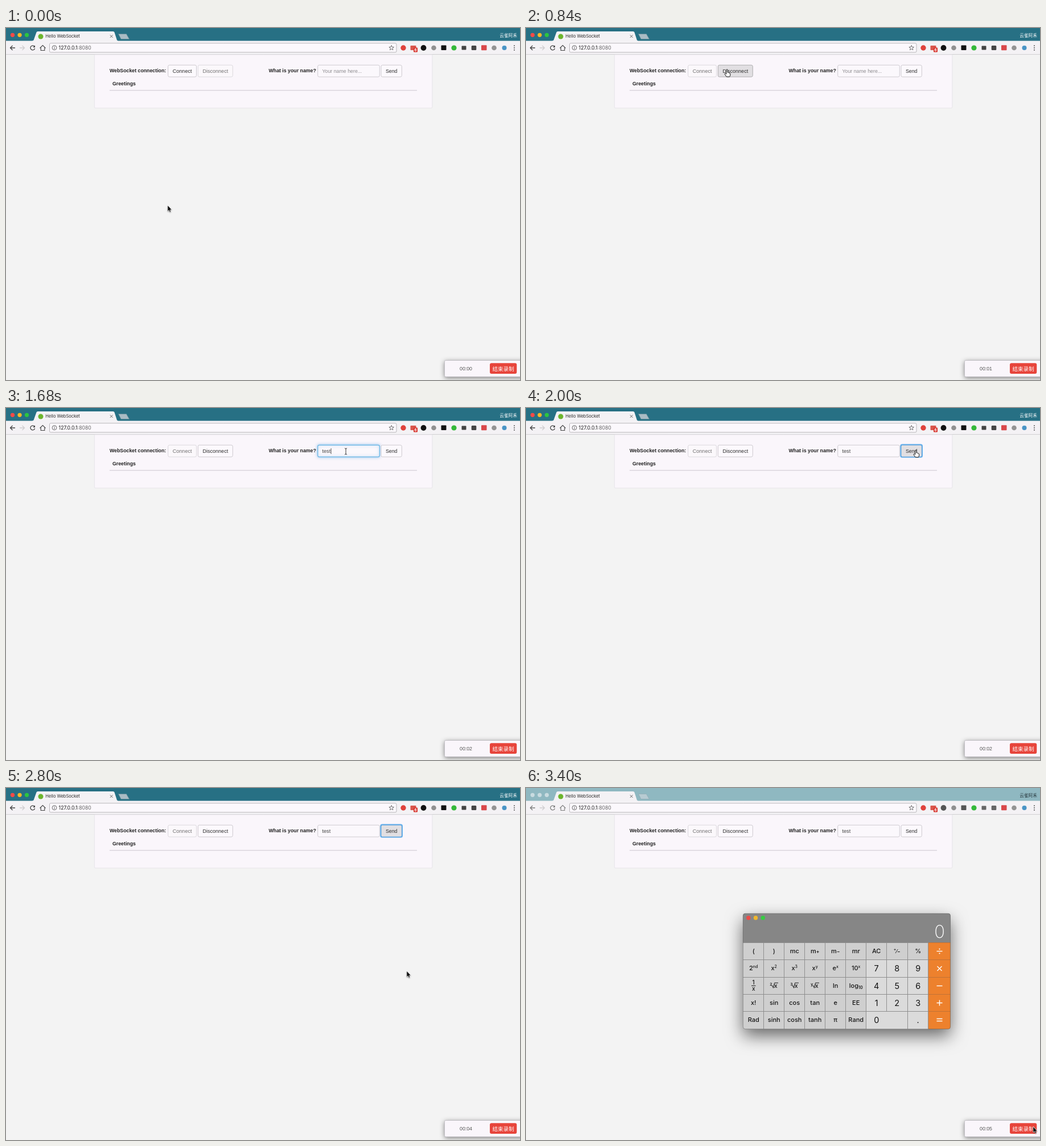
Animation of 903x620 px, one loop 3.44 s. Source, as an HTML page with a canvas:

```html
<!DOCTYPE html>
<html lang="en">
<head>
<meta charset="utf-8">
<title>Hello WebSocket</title>
<style>
html, body { margin: 0; width: 100%; height: 100%; overflow: hidden; background: #f3f3f3; }
canvas { display: block; }
</style>
</head>
<body>
<canvas id="stage" width="903" height="620"></canvas>
<script>
const c = document.getElementById('stage').getContext('2d');
const LOOP = 3440, STEP = 40;
const SANS = '"Liberation Sans", Arial, sans-serif';
const UI = 'Inter, Roboto, sans-serif';
const CJK = '"Noto Sans CJK SC", "Noto Sans CJK", sans-serif';

// Moments when the page state changes, in ms
const CONNECTED = 680, FOCUS = 1200, TYPE = 1360, KEY = 80, SENT = 1920, CALC = 2840;
// Pointer stops: time, x, y
const PATH = [
  [0, 284, 313], [80, 284, 313], [480, 319, 74], [760, 319, 74], [1120, 590, 76],
  [1640, 590, 76], [1880, 685, 75], [2080, 685, 75], [2480, 704, 323],
  [2960, 704, 323], [3340, 891, 597], [LOOP, 891, 597]
];

function text(s, x, y, size, color, font = SANS, weight = 400, align = 'left') {
  c.font = `${weight} ${size}px ${font}`;
  c.textAlign = align;
  c.fillStyle = color;
  c.fillText(s, x, y);
}
function box(x, y, w, h, r, fill, stroke, lw = 1) {
  c.beginPath();
  c.roundRect(x, y, w, h, r);
  if (fill) { c.fillStyle = fill; c.fill(); }
  if (stroke) { c.strokeStyle = stroke; c.lineWidth = lw; c.stroke(); }
}
function dot(x, y, r, fill) {
  c.beginPath();
  c.arc(x, y, r, 0, 7);
  c.fillStyle = fill;
  c.fill();
}
function shape(pts, fill, stroke, lw = 1) {
  c.beginPath();
  pts.forEach(p => c.lineTo(p[0], p[1]));
  c.closePath();
  if (fill) { c.fillStyle = fill; c.fill(); }
  if (stroke) { c.strokeStyle = stroke; c.lineWidth = lw; c.stroke(); }
}
function stroke(d, color, lw = 1) {
  c.strokeStyle = color;
  c.lineWidth = lw;
  c.stroke(new Path2D(d));
}
function shadow(color, blur, dy) {
  c.shadowColor = color;
  c.shadowBlur = blur;
  c.shadowOffsetY = dy;
}

function drawBrowser(on) {
  c.fillStyle = on ? '#277084' : '#8fb8c1';
  c.fillRect(0, 0, 903, 24);
  const lights = on ? ['#fb4a47', '#fdb825', '#2cc63f'] : Array(3).fill('#c9dbe0');
  lights.forEach((col, i) => dot(11.5 + 12.5 * i, 12.3, 3.6, col));

  c.fillStyle = '#f4f2f5';
  c.fillRect(0, 22.6, 903, 23.9);
  c.fill(new Path2D('M46 23L48.500 21.500L53.500 7.500Q54 6 56 6H188Q190 6 190.500 7.500L195 21.500L197 23Z'));
  shape([[197.5, 10.5], [211.5, 10.5], [216.5, 19.5], [202, 19.5]], on ? '#a9bbc4' : '#b7cbd2', on ? '#5f8b9a' : '#8caab3', .7);
  c.fillStyle = '#c9c7ca';
  c.fillRect(0, 46, 903, .8);

  dot(61, 15, 4.5, '#6db52d');
  text('Hello WebSocket', 69.3, 17.3, 7.5, '#2a2a2a', UI);
  stroke('M182.800 12.200l4.800 4.800m0-4.800l-4.800 4.800', '#666', 1);
  text('云雀阿禾', 898, 15.8, 7.7, on ? '#fff' : '#26363b', CJK, 500, 'right');

  const ink = on ? '#444' : '#7d7d7d';
  stroke('M16 35H7.500M11.500 31l-4 4l4 4', ink, 1.3);
  stroke('M24 35h8.500M28.500 31l4 4l-4 4', '#cfcdd0', 1.3);
  stroke('M49.700 32.300A3.900 3.900 0 1 0 50.600 36', ink, 1.3);
  shape([[51, 30.6], [51, 34.3], [47.3, 34.3]], ink);
  stroke('M59.500 35.500L64.500 30.500L69.500 35.500M61.200 34.800V39.500H67.800V34.800', ink, 1.1);

  box(76.5, 26.8, 609.5, 16, 2, '#fbf8fc', '#b9b7ba');
  c.beginPath();
  c.arc(85, 34.8, 3.9, 0, 7);
  c.strokeStyle = '#555';
  c.lineWidth = .9;
  c.stroke();
  c.fillStyle = '#555';
  c.fillRect(84.5, 34.2, 1, 2.8);
  c.fillRect(84.5, 32.4, 1, 1);
  text('127.0.0.1', 92.6, 38, 8.7, '#1c1c1c', UI);
  const w = c.measureText('127.0.0.1').width;
  text(':8080', 92.6 + w, 38, 8.7, '#666', UI);
  const star = Array.from({ length: 10 }, (_, i) => {
    const a = i * Math.PI / 5 - Math.PI / 2, r = i % 2 ? 1.9 : 4.5;
    return [677.2 + r * Math.cos(a), 35 + r * Math.sin(a)];
  });
  shape(star, null, '#555', .8);

  const dark = on ? '#111' : '#555';
  const mid = on ? '#444' : '#666';
  dot(698, 35, 4.7, '#e0423c');
  box(710.5, 31, 10, 8, 1, '#d9564c');
  box(716, 34.5, 7, 8, 1, '#d8352f');
  text('6', 719.5, 41.2, 7, '#fff', SANS, 700, 'center');
  dot(733.5, 35, 4.9, dark);
  dot(751.5, 35, 4.3, '#909090');
  box(764.5, 30.5, 9, 8.5, 1, dark);
  dot(787, 35, 4.6, '#34b93a');
  box(800.5, 31.5, 8, 7, 1, mid);
  box(817.7, 31, 8.6, 8, 1.5, mid);
  box(835, 30.3, 9.5, 9, 1, '#d9484a');
  dot(857.5, 35, 4.3, '#949494');
  dot(875.5, 35, 4, '#4a95c6');
  [31.2, 35, 38.8].forEach(y => dot(893, y, 1.05, '#555'));
}

function button(s, x, w, size, { off, hot, ring } = {}) {
  c.save();
  if (off) c.globalAlpha = .67;
  if (ring) box(x - .7, 64.6, w + 1.4, 22, 2.5, null, '#62b0ee', 2);
  box(x, 65.3, w, 20.8, 2.5, hot ? '#e1dfe2' : '#fcf9fd', ring ? '#5b9fd6' : hot ? '#a9a7aa' : '#c9c6cb', .9);
  text(s, x + w / 2, 79, size, '#2e2e2e', SANS, 400, 'center');
  c.restore();
}

function drawPage(t, x, y) {
  const open = t >= CONNECTED, sent = t >= SENT, calc = t >= CALC;
  const over = (l, r) => x > l && x < r && y > 64 && y < 87;
  box(155.3, 47, 593.6, 94, [0, 0, 2, 2], '#faf6fb', '#e5e2e7', .9);

  text('WebSocket connection:', 182, 78.3, 8.78, '#222', SANS, 700);
  text('What is your name?', 461.5, 78.3, 8.78, '#222', SANS, 700);
  text('Greetings', 187, 101, 8.78, '#222', SANS, 700);
  c.fillStyle = '#d6d2d9';
  c.fillRect(182, 109.2, 540, 1.3);

  button('Connect', 284.7, 49.8, 9.05, { off: open, hot: !open && over(284, 335) });
  button('Disconnect', 337.3, 61, 9.05, { off: !open, hot: open && over(337, 399) });

  const focus = t >= FOCUS && !sent;
  const typed = 'test'.slice(0, Math.max(0, Math.floor((t - TYPE) / KEY) + 1));
  c.save();
  if (focus) shadow('rgba(102,175,233,.7)', 5, 0);
  box(547.7, 65.3, 108.6, 20.8, 2.5, '#fbf8fc', focus ? '#66b5e4' : '#cbc8cd', focus ? 1.2 : .9);
  c.restore();
  if (typed) text(typed, 555.5, 79, 9.1, '#444');
  else text('Your name here...', 555.5, 79, 8.8, '#8e8c90');
  if (focus) {
    const cx = typed ? 556 + c.measureText(typed).width : 555.8;
    c.fillStyle = '#333';
    c.fillRect(cx, 71, .8, 10);
  }
  button('Send', 659, 36.3, 8.8, { hot: sent ? !calc : over(658, 696), ring: sent && !calc });
}

// Runs are split by spaces: ^ raised, _ lowered, ~ small
const RUNS = { '^': [7, -4, 500], '_': [7, 2, 600], '~': [8.5, -.3, 600] };
function label(s, x, y) {
  const runs = s.split(' ').map(r => {
    const style = RUNS[r[0]];
    const [size, dy, weight] = style || [11, 0, 500];
    const str = style ? r.slice(1) : r;
    c.font = `${weight} ${size}px ${UI}`;
    return { str, size, dy, weight, w: c.measureText(str).width };
  });
  let left = x - runs.reduce((sum, r) => sum + r.w, 0) / 2;
  for (const r of runs) {
    text(r.str, left, y + r.dy, r.size, '#161616', UI, r.weight);
    left += r.w;
  }
}
function root(n, x, y) {
  text(n, x - 7.2, y - .8, 6.8, '#161616', UI, 600);
  text('x', x + .3, y + 3.9, 10.5, '#161616', UI, 500);
  stroke(`M${x - 4} ${y + .5}l1.300 -.8l1.700 4.300l2-9h6.500`, '#161616', 1);
}

const KEYS = [
  '(|)|mc|m ~+|m ~−|mr|AC|^+ ~⁄ ~−|%',
  '2 ^nd|x ^2|x ^3|x ^y|e ^x|10 ^x|7|8|9',
  '||||ln|log _10|4|5|6',
  'x!|sin|cos|tan|e|EE|1|2|3',
  'Rad|sinh|cosh|tanh|π|Rand|0||.'
].map(row => row.split('|'));

function drawCalc() {
  const colX = i => Math.floor(381.2 + 36.1 * i) + .5;
  const rowY = i => Math.floor(272.5 + 30.3 * i) + .5;
  const frame = [381.3, 221, 364.2, 203.5, 4];
  c.save();
  shadow('rgba(0,0,0,.58)', 30, 12);
  box(...frame, '#858585');
  c.restore();
  c.save();
  c.beginPath();
  c.roundRect(...frame);
  c.clip();
  c.fillStyle = '#868686';
  c.fillRect(381, 221, 365, 52);
  c.fillStyle = '#cfcfcf';
  c.fillRect(381, 272.5, 326, 153);
  c.fillStyle = '#dbdbdb';
  c.fillRect(colX(6), rowY(1), 110, 122);
  c.fillStyle = '#ed812d';
  c.fillRect(707, 272.5, 39, 153);
  for (let i = 1; i < 10; i++) {
    stroke(`M${colX(i)} 272.500V${i === 7 ? rowY(4) : 425}`, '#909090');
  }
  for (let i = 0; i < 5; i++) {
    stroke(`M381 ${rowY(i)}H707`, '#8e8e8e');
    stroke(`M707 ${rowY(i)}H746`, '#c17236');
  }
  c.restore();
  box(...frame, null, 'rgba(70,70,70,.45)', .8);
  ['#ed4b48', '#f0b72c', '#36cc42'].forEach((col, i) => dot(390.8 + 12.7 * i, 228.8, 3.7, col));
  text('0', 726.5, 264.2, 31, '#fff', UI, 200, 'center');

  KEYS.forEach((row, r) => row.forEach((s, i) => {
    const x = colX(i) + 18.2, y = rowY(r) + 15;
    if (/^[\d.]$/.test(s)) text(s, x, y + 5.4, 14.5, '#111', UI, 400, 'center');
    else if (s) label(s, x, y + 3.5);
  }));
  const y = rowY(2) + 14.8;
  text('1', 399.7, y - 2, 10, '#161616', UI, 500, 'center');
  text('x', 399.7, y + 8.5, 10, '#161616', UI, 500, 'center');
  stroke(`M396 ${y}h7.500`, '#161616', 1);
  ['2', '3', 'y'].forEach((n, i) => root(n, colX(i + 1) + 18, y));

  const ops = ['M721.500 287.500h10', 'M722.500 314l8 8m0-8l-8 8', 'M721.500 348.500h10',
    'M721.500 378.500h10m-5-5v10', 'M721.500 406.500h10m-10 4h10'];
  ops.forEach(d => stroke(d, '#fff', 1.4));
  dot(726.5, 283.7, 1.1, '#fff');
  dot(726.5, 291.3, 1.1, '#fff');
}

function drawRecorder(t) {
  const sec = Math.max(0, Math.floor((t - 100) / 650));
  c.save();
  shadow('rgba(0,0,0,.5)', 8, 2);
  box(770.5, 585.5, 140, 28.8, 2, '#faf6fb');
  c.restore();
  box(770.5, 585.5, 140, 28.8, 2, null, '#b5b2b8', .7);
  text('00:0' + sec, 808, 603.2, 8.8, '#555', SANS, 400, 'center');
  box(850, 590.3, 47.3, 18.8, 3, '#e7443b');
  text('结束录制', 873.4, 603.5, 9.5, '#fff', CJK, 500, 'center');
}

function pointerAt(t) {
  const i = PATH.findIndex(p => p[0] > t);
  const [t0, x0, y0] = PATH[i - 1], [t1, x1, y1] = PATH[i];
  const u = (t - t0) / (t1 - t0), k = u * u * (3 - 2 * u);
  return [x0 + (x1 - x0) * k, y0 + (y1 - y0) * k];
}

function drawPointer(t, x, y) {
  const inRow = y > 64 && y < 87;
  const onInput = inRow && x > 547 && x < 657;
  const onButton = inRow && (t < CONNECTED ? x > 284 && x < 335 : x > 337 && x < 399 || x > 658 && x < 696);
  if (onInput && t > FOCUS + STEP && t <= 1640) return;
  c.save();
  c.translate(x, y);
  c.lineJoin = 'round';
  if (onInput) {
    stroke('M-2-5q2 0 2 1.500v8q0 1.500-2 1.500M2-5q-2 0-2 1.500M2 6q-2 0-2-1.500', '#222', .9);
  } else if (onButton) {
    const hand = new Path2D('M-1.200 6V.2Q-1.200-1 0-1T1.100.2V4Q2.300 3.300 2.900 4.600Q4.100 4 4.400 5.400Q5.600 5.200 5.600 6.600V8.500Q5.600 10 4.400 11.700H-.8L-3.900 7.300Q-4.300 6-3.100 5.700Q-2.200 5.700-1.200 7Z');
    c.fillStyle = '#fff';
    c.fill(hand);
    c.strokeStyle = '#111';
    c.lineWidth = 1;
    c.stroke(hand);
  } else {
    shadow('rgba(0,0,0,.35)', 2, 1);
    const tip = [[.3, 0], [.3, 9.4], [2.4, 7.4], [3.9, 10.8], [5.3, 10.2], [3.9, 6.9], [6.6, 6.7]];
    shape(tip, '#111', '#fff', 1.1);
    c.shadowColor = 'transparent';
    shape(tip, '#111');
  }
  c.restore();
}

function draw(now) {
  const t = Math.floor((now % LOOP) / STEP) * STEP;
  const [x, y] = pointerAt(t);
  c.fillStyle = '#f3f3f3';
  c.fillRect(0, 0, 903, 620);
  drawBrowser(t < CALC);
  drawPage(t, x, y);
  if (t >= CALC) drawCalc();
  drawRecorder(t);
  drawPointer(t, x, y);
}

const start = performance.now();
function tick() {
  draw(performance.now() - start);
  requestAnimationFrame(tick);
}
tick();
</script>
</body>
</html>
```
